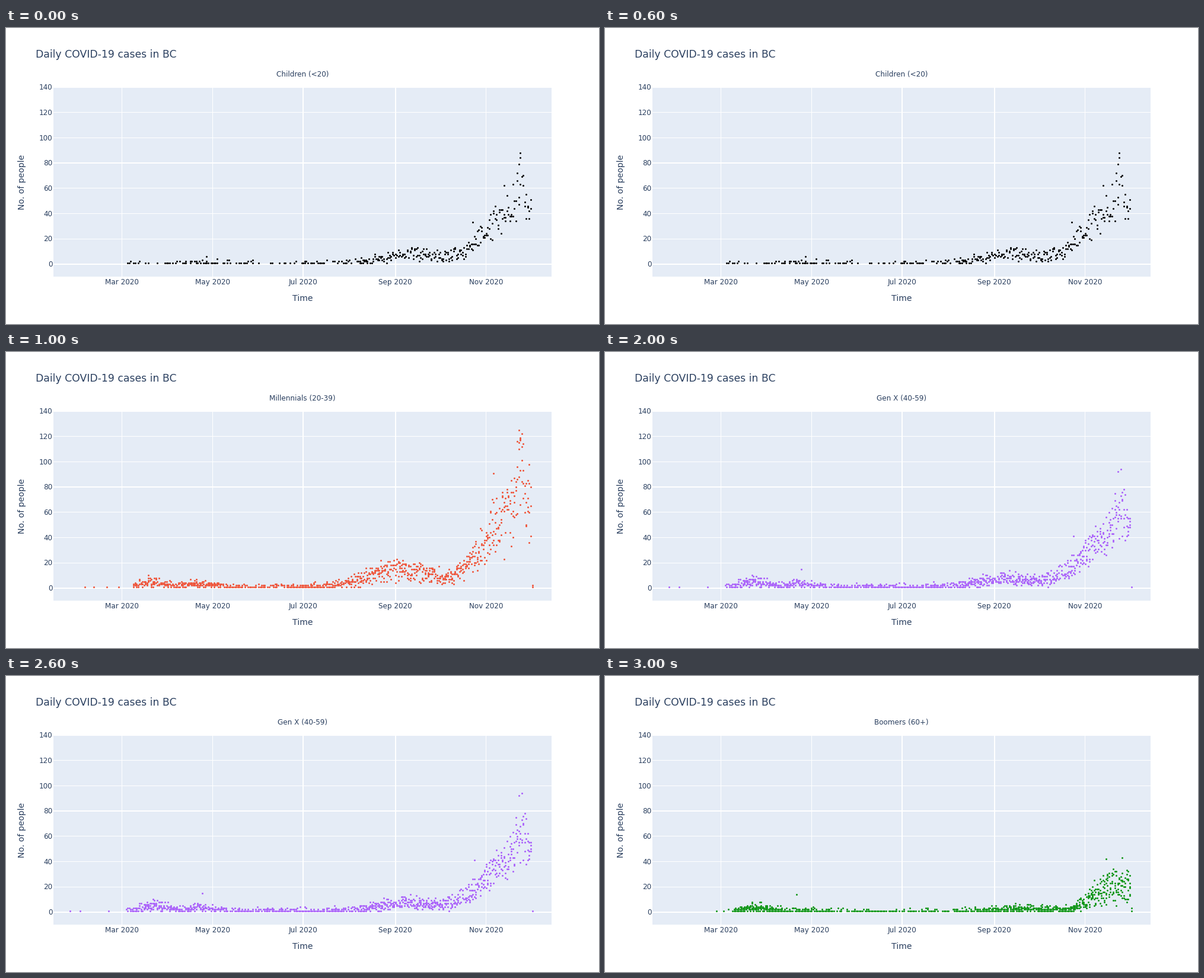
Recreate the animation shown at these times as a matplotlib script. Size 1000 by 500 pixels, loop 4000 ms.

```python
import numpy as np
import matplotlib.pyplot as plt
from matplotlib.animation import FuncAnimation

W, H, DPI = 1000, 500, 100
INK, PANEL = "#2a3f5f", "#e5ecf6"
LAST_DAY = 275  # days counted from 1 March

plt.rcParams["font.family"] = "DejaVu Sans"


def px(size):
    """Pixels to points."""
    return size * 72 / DPI


def day_x(day):
    return 195.3 + 2.508 * np.asarray(day, float)


def case_y(n):
    return 398.67 - 320 / 150 * np.asarray(n, float)


# waves: (centre day, width, height); autumn: (plateau, middle day, pace)
# lone: a few striking dots as (day, cases)
GROUPS = [
    dict(name="Children (<20)", color="#000000", start=4, subgroups=2,
         spread=0.1, floor=0.3, autumn=(52, 246, 10),
         waves=[(52, 14, 0.9), (195, 28, 7), (268, 2.5, 24)],
         lone=[(268, 84), (267, 79), (257, 62), (236, 33), (57, 6)]),
    dict(name="Millennials (20-39)", color="#ef553b", start=8, subgroups=4,
         spread=0.2, floor=0.8, autumn=(70, 243, 9),
         waves=[(20, 9, 4), (52, 14, 2.6), (186, 30, 14.5), (268, 3, 25)],
         lone=[(-25, 1), (-19, 1), (-10, 1), (-2, 1), (267, 125), (268, 118),
               (270, 114), (250, 91), (276, 1), (276, 2)]),
    dict(name="Gen X (40-59)", color="#ab63fa", start=3, subgroups=4,
         spread=0.13, floor=0.7, autumn=(50, 244, 9),
         waves=[(24, 12, 4.5), (54, 10, 3), (195, 30, 7), (268, 4, 18)],
         lone=[(-35, 1), (-28, 1), (-9, 1), (269, 94), (237, 41), (54, 15),
               (276, 1)]),
    dict(name="Boomers (60+)", color="#109618", start=8, subgroups=6,
         spread=0.3, floor=0.22, autumn=(22, 247, 5),
         waves=[(25, 12, 3), (55, 16, 0.9), (200, 28, 2)],
         lone=[(-3, 1), (2, 1), (5, 2), (270, 43), (259, 42), (51, 14),
               (276, 1), (276, 3)]),
]


def mean_cases(day, group):
    """Mean per subgroup: a floor, bell-shaped waves and a logistic autumn."""
    plateau, middle, pace = group["autumn"]
    mean = group["floor"] + plateau / (1 + np.exp((middle - day) / pace))
    for centre, width, height in group["waves"]:
        mean += height * np.exp(-((day - centre) / width) ** 2)
    return mean


def simulate(group, seed):
    """Daily counts per subgroup; zero counts leave no dot."""
    rng = np.random.default_rng(seed)
    days = np.repeat(np.arange(group["start"], LAST_DAY + 1), group["subgroups"])
    mean = mean_cases(days, group)
    rate = mean * rng.normal(1, group["spread"], days.size).clip(0.4, 1.6)
    cases = rng.poisson(rate)
    keep = (cases > 0) & (cases < 1.4 * mean + 4)
    dots = np.column_stack([days[keep], cases[keep]])
    dots = np.unique(np.vstack([dots, group["lone"]]), axis=0)
    return np.column_stack([day_x(dots[:, 0]), case_y(dots[:, 1])])


fig = plt.figure(figsize=(W / DPI, H / DPI), dpi=DPI, facecolor="white")
ax = fig.add_axes([0, 0, 1, 1])
ax.set(xlim=(0, W), ylim=(H, 0))
ax.axis("off")


def label(x, y, text, size, ha="center", **kw):
    return ax.text(x, y, text, fontsize=px(size), color=INK, ha=ha,
                   va="baseline", **kw)


def grid(xs, ys, width):
    ax.plot(xs, ys, color="white", lw=px(width), solid_capstyle="butt",
            snap=False, zorder=1)


def crisp(pos, width):
    """Line centre that fills whole pixels."""
    return round(float(pos)) if width == 2 else int(pos) + 0.5


ax.add_patch(plt.Rectangle((80, 100), 840, 320, fc=PANEL, lw=0, zorder=0))

for day, month in [(0, "Mar"), (61, "May"), (122, "Jul"), (184, "Sep"), (245, "Nov")]:
    x = day_x(day)
    width = 2 if month in ("Jul", "Sep") else 1
    grid([crisp(x, width)] * 2, [100, 420], width)
    label(x, 433, f"{month} 2020", 12)

for n in range(0, 141, 20):
    y = case_y(n)
    width = 2 if n in (0, 80) else 1
    grid([80, 920], [crisp(y, width)] * 2, width)
    label(78.5, y + 4.4, str(n), 12, ha="right")

label(50, 50, "Daily COVID-19 cases in BC", 17.3, ha="left")
label(500, 461, "Time", 14)
label(31.5, 260, "No. of people", 14, rotation=90, rotation_mode="anchor")

subtitle = label(500, 82, "", 12)
dots = ax.scatter([], [], s=px(3) ** 2, linewidths=0, zorder=3)
clouds = [simulate(group, seed) for seed, group in enumerate(GROUPS, 5)]


def draw(i):
    subtitle.set_text(GROUPS[i]["name"])
    dots.set_offsets(clouds[i])
    dots.set_facecolor(GROUPS[i]["color"])
    return subtitle, dots


anim = FuncAnimation(fig, draw, frames=len(GROUPS), interval=1000,
                     repeat=True, repeat_delay=0, blit=False)
plt.show()
```
